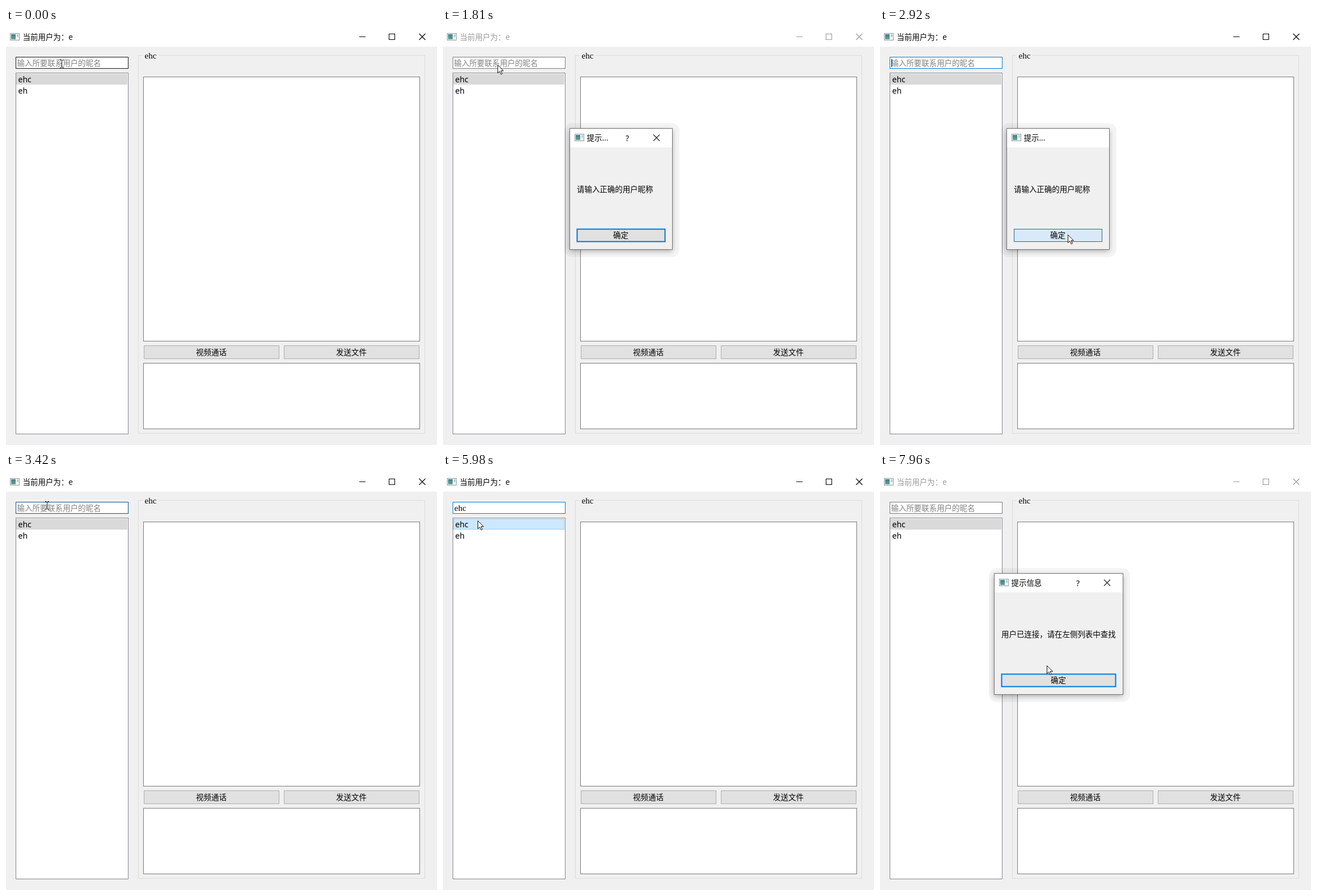
Recreate the animation shown at these times as an HTML page. Size 760 by 737 pixels, loop 7.99 s.

```html
<!DOCTYPE html>
<html lang="zh-CN">
<head>
<meta charset="utf-8">
<style>
  html, body { margin: 0; width: 100%; height: 100%; overflow: hidden; background: #f0f0f0; }
  svg { display: block; width: 100vw; height: 100vh; }
  text { white-space: pre; }
  .ui { font: 13.45px "Noto Sans CJK SC", "Noto Sans CJK", sans-serif; }
  .list { font: 14px "Noto Sans", "Open Sans", sans-serif; }
  .song { font: 15px "Liberation Serif", serif; }
  .mid { text-anchor: middle; }
  .line { fill: none; stroke-width: 1.1; }
</style>
</head>
<body>
<svg id="stage" viewBox="0 0 760 737">
  <defs>
    <filter id="blur" x="-20%" y="-20%" width="140%" height="140%"><feGaussianBlur stdDeviation="5"/></filter>
    <linearGradient id="teal" x2="0" y2="1"><stop stop-color="#3f7f8f"/><stop offset="1" stop-color="#5fa58c"/></linearGradient>
    <g id="icon">
      <rect x=".5" y=".5" width="16" height="12" fill="#f4f6f7" stroke="#8f9aa0"/>
      <rect x="2" y="2" width="8" height="9" fill="url(#teal)"/>
      <rect x="12" y="2" width="3" height="5" fill="#b9cdd2"/>
    </g>
  </defs>
</svg>
<script>
const LOOP = 7990;
const USERS = ["ehc", "eh"];
const ME = "e";
const stage = document.getElementById("stage");

function add(parent, tag, attrs, text) {
  const node = document.createElementNS("http://www.w3.org/2000/svg", tag);
  set(node, attrs);
  if (text !== undefined) node.textContent = text;
  parent.append(node);
  return node;
}
function set(node, attrs) {
  for (const key in attrs) node.setAttribute(key, attrs[key]);
}
const show = (node, on) => set(node, { visibility: on ? "inherit" : "hidden" });
const group = (parent = stage) => add(parent, "g", {});
const label = (parent, x, y, text, cls = "ui", fill = "#000") =>
  add(parent, "text", { x, y, class: cls, fill }, text);
// Box with a crisp one pixel border; the edges are pixel indices.
const box = (parent, left, top, right, bottom, fill, stroke) =>
  add(parent, "rect", { x: left + .5, y: top + .5, width: right - left, height: bottom - top, fill, stroke });
const cross = (parent, x, y, r, stroke) =>
  add(parent, "path", { d: `M${x - r} ${y - r}l${2 * r} ${2 * r}m0 ${-2 * r}l${-2 * r} ${2 * r}`, class: "line", stroke });
function button(parent, left, right, top, bottom, text) {
  const face = box(parent, left, top, right, bottom, "#e1e1e1", "#adadad");
  label(parent, (left + right) / 2, (top + bottom) / 2 + 5.3, text, "ui mid");
  return face;
}

// Main window
add(stage, "rect", { width: 760, height: 737, fill: "#f0f0f0" });
add(stage, "rect", { width: 760, height: 33, fill: "#fff" });
add(stage, "use", { href: "#icon", x: 7, y: 9 });
const title = label(stage, 29.5, 20.8, "当前用户为：" + ME);
const controls = group();
add(controls, "path", { d: "M623 15.5h11M675.5 10.5h10v10h-10z", class: "line" });
cross(controls, 734, 15.5, 5.5, "inherit");
controls.lastChild.removeAttribute("stroke");

const field = box(stage, 17, 51, 215, 71, "#fff", "#171717");
const hint = label(stage, 19.5, 66.5, "输入所要联系用户的昵名", "ui", "#808080");
const typed = label(stage, 20, 67, "", "song");
const caret = add(stage, "rect", { y: 55, width: 1, height: 14, fill: "#000" });

box(stage, 17, 79, 215, 717, "#fff", "#828790");
const row = box(stage, 18, 81, 213, 99, "#d9d9d9", "#d9d9d9");
USERS.forEach((name, i) => label(stage, 21.5, 95.5 + 20 * i, name, "list"));

box(stage, 233, 48, 738, 716, "none", "#dcdcdc");
add(stage, "rect", { x: 241, y: 46, width: 28, height: 5, fill: "#f0f0f0" });
label(stage, 244.5, 53.5, USERS[0], "song");
box(stage, 242, 86, 729, 553, "#fff", "#7a7a7a");
button(stage, 243, 481, 561, 584, "视频通话");
button(stage, 490, 728, 561, 584, "发送文件");
box(stage, 242, 592, 729, 708, "#fff", "#7a7a7a");

// Completion list
const popup = group();
add(popup, "path", { d: "M20 112.5H218V74", fill: "none", stroke: "#000", "stroke-width": 4, "stroke-opacity": .22 });
box(popup, 17, 70, 215, 111, "#fff", "#646464");
USERS.forEach((name, i) => label(popup, 21.5, 87 + 18 * i, name, "list"));

function dialog(left, right, caption, message) {
  const root = group();
  const width = right - left;
  add(root, "rect", { x: left - 9, y: 168, width: width + 22, height: 237, rx: 14, fill: "#000", opacity: .045 });
  add(root, "rect", { x: left, y: 181, width, height: 213, filter: "url(#blur)", opacity: .32 });
  box(root, left, 177, right, 391, "#f0f0f0", "#707070");
  add(root, "rect", { x: left + 1, y: 178, width: width - 1, height: 33, fill: "#fff" });
  add(root, "use", { href: "#icon", x: left + 9, y: 187 });
  label(root, left + 30.5, 199, caption);
  const tools = group(root);
  label(tools, right - 79, 199.5, "?", "list mid");
  cross(tools, right - 27.5, 194, 5.5, "#222");
  label(root, left + 13, 290, message);
  const face = button(root, left + 13, right - 13, 355, 377, "确定");
  set(face, { stroke: "#0078d7", "stroke-width": 2 });
  return { root, tools, face };
}
const wrongName = dialog(223, 404, "提示...", "请输入正确的用户昵称");
const known = dialog(201, 428, "提示信息", "用户已连接，请在左侧列表中查找");

// Pointers
const arrow = add(stage, "path", {
  d: "M.5 .5V14.5L3.8 11.5 6.2 16.8 8.4 15.8 6 10.7H10.5Z",
  fill: "#fff", stroke: "#111", "stroke-linejoin": "round"
});
const beam = add(stage, "path", {
  d: "M-3 -6.5H-1L.5 -5.5 2 -6.5H4M.5 -5.5V6M-3 7H-1L.5 6 2 7H4", fill: "none", stroke: "#111"
});

// Pointer stops: time, x, y
const POINTER = [
  [0, 98, 63], [180, 98, 63], [181, 96, 65], [1820, 96, 65], [2050, 150, 160], [2230, 150, 160],
  [2680, 331, 365], [3060, 331, 365], [3410, 72, 57], [3450, 72, 57], [3670, 73, 60],
  [4350, 73, 60], [4351, 71, 61], [5380, 71, 61], [5490, 79, 76], [5630, 61, 84], [7160, 61, 84],
  [7310, 143, 193], [7680, 143, 193], [7960, 294, 340], [LOOP, 294, 340]
];
const progress = (t, from, to) => Math.min(1, Math.max(0, (t - from) / (to - from)));
const smooth = p => p * p * (3 - 2 * p);
const within = (t, ...spans) => spans.some(([from, to]) => t >= from && t < to);

function pointerAt(t) {
  const i = POINTER.findIndex(stop => stop[0] > t);
  const [t0, x0, y0] = POINTER[i - 1], [t1, x1, y1] = POINTER[i];
  const p = smooth(progress(t, t0, t1));
  return [Math.round(x0 + (x1 - x0) * p), Math.round(y0 + (y1 - y0) * p)];
}
function mix(from, to, p) {
  return `rgb(${from.map((c, i) => Math.round(c + (to[i] - c) * p))})`;
}
const DARK = [23, 23, 23], BLUE = [0, 120, 215];

function fieldColor(t) {
  if (within(t, [1520, 2880], [6660, LOOP])) return "#7a7a7a";
  if (t < 1520) return mix(DARK, BLUE, progress(t, 710, 940));
  if (t < 5000) return mix(BLUE, DARK, progress(t, 3340, 3550));
  return mix(DARK, BLUE, progress(t, 5000, 5220));
}
function fieldText(t) {
  if (within(t, [180, 1520], [4350, 5900])) return ME;
  return within(t, [5900, 6660]) ? USERS[0] : "";
}
function fade(node, opacity, scale) {
  show(node, opacity > 0);
  set(node, { opacity, transform: `translate(314 284) scale(${scale}) translate(-314 -284)` });
}

function draw(t) {
  const active = !within(t, [1520, 2880], [6660, LOOP]);
  set(title, { fill: active ? "#000" : "#999" });
  set(controls, { stroke: active ? "#000" : "#999" });

  const text = fieldText(t);
  set(field, { stroke: fieldColor(t) });
  typed.textContent = text;
  show(hint, !text);
  show(caret, within(t, [180, 710], [1220, 1520], [2880, 3300], [3830, 5000], [5530, 5980], [6510, 6660]));
  set(caret, { x: 20 + 7 * text.length });
  show(popup, within(t, [220, 1520], [4400, 5840]));

  const hot = within(t, [5980, 6660]);
  set(row, { fill: hot ? "#cce8ff" : "#d9d9d9", stroke: hot ? "#99d1ff" : "#d9d9d9" });

  const opened = smooth(progress(t, 1520, 1700));
  const closed = smooth(progress(t, 3030, 3170));
  fade(wrongName.root, opened * (1 - closed), .92 + .08 * opened - .08 * closed);
  show(wrongName.tools, t < 2880);
  const pressed = t >= 2830;
  set(wrongName.face, {
    fill: pressed ? "#d8eaf9" : mix([225, 225, 225], [229, 241, 251], progress(t, 2640, 2800)),
    stroke: pressed ? "#1f6aa8" : "#0078d7",
    "stroke-width": pressed ? 1 : 2
  });
  fade(known.root, t >= 6660 ? 1 : 0, 1);

  const [x, y] = pointerAt(t);
  const hidden = within(t, [180, 560], [4350, 4480]);
  const typing = t < 180 || (within(t, [3060, 4350]) && x < 216 && y > 50 && y < 72);
  show(arrow, !hidden && !typing);
  show(beam, !hidden && typing);
  set(arrow, { transform: `translate(${x} ${y})` });
  set(beam, { transform: `translate(${x} ${y})` });
}

const start = performance.now();
function tick() {
  draw((performance.now() - start) % LOOP);
  requestAnimationFrame(tick);
}
tick();
</script>
</body>
</html>
```
